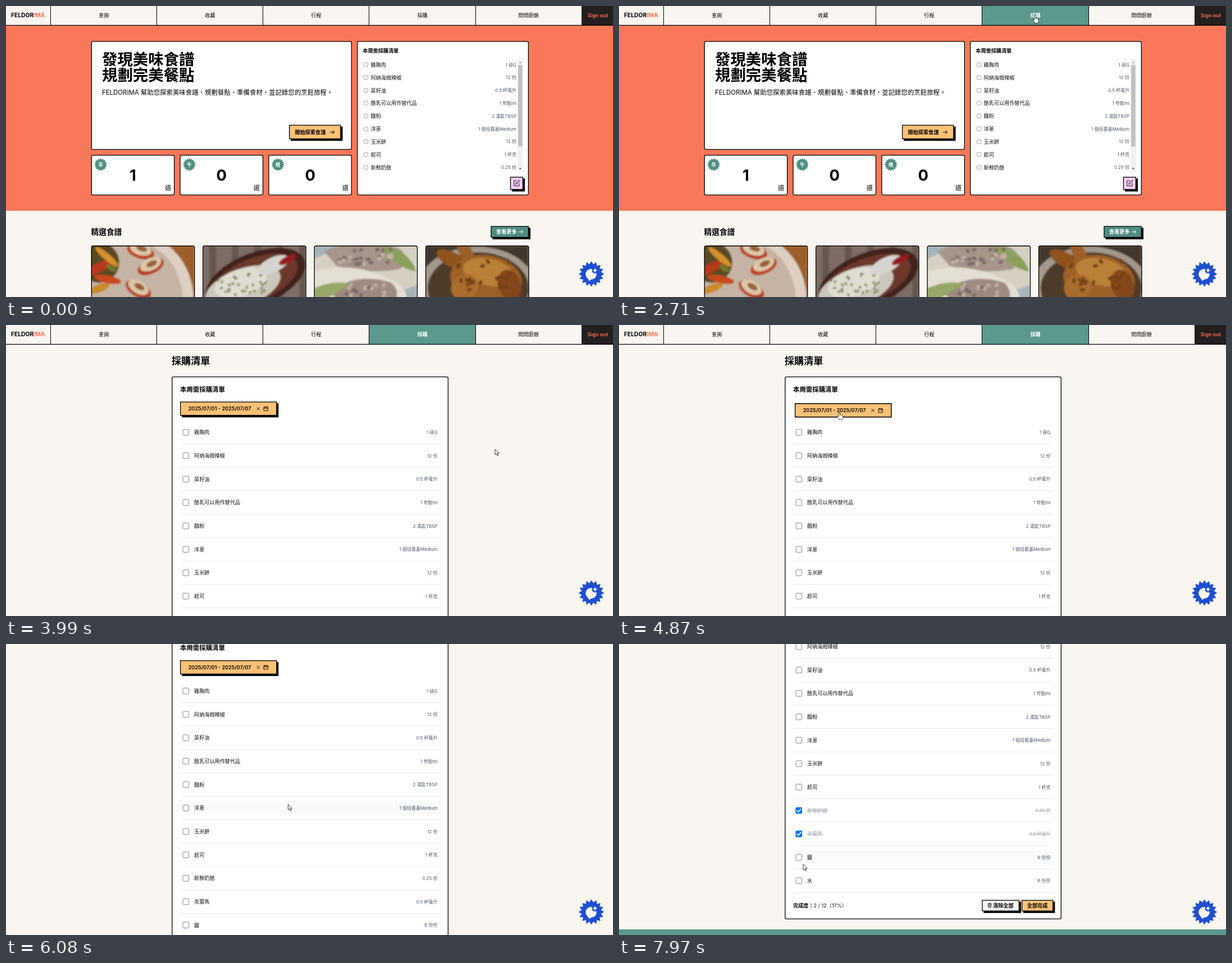
Recreate the animation shown at these times as an HTML page. Size 1081 by 518 pixels, loop 8 s.

```html
<!DOCTYPE html>
<html lang="zh-Hant">
<head>
<meta charset="utf-8">
<title>Recipe planner</title>
<style>
  html, body { margin: 0; width: 100%; height: 100%; overflow: hidden; background: #f9f5f0; }
  svg { display: block; width: 1081px; height: 518px; }
  text { font-family: Inter, "Noto Sans CJK TC", "Noto Sans TC", "Noto Sans CJK", sans-serif; white-space: pre; }
</style>
</head>
<body>
<svg id="stage" viewBox="0 0 1081 518" xmlns="http://www.w3.org/2000/svg"></svg>
<script>
const LOOP = 8000;
const INK = '#000', CREAM = '#f9f5f0', CORAL = '#fa785a', GREEN = '#5a998c', TEAL = '#4f8d80',
      AMBER = '#fec176', GREY = '#4b5563', MUTED = '#9ca3af', BLUE = '#1d4fd0';
const BASE = 9.14, ROW0 = 191, PITCH = 41.67, SCROLL = 228;

const items = [
  ['雞胸肉', '1 磅G'], ['阿納海姆辣椒', '12 份'], ['菜籽油', '0.5 杯毫升'],
  ['酪乳可以用作替代品', '1 夸脫ml'], ['麵粉', '2 湯匙TBSP'], ['洋蔥', '1 個培養基Medium'],
  ['玉米餅', '12 份'], ['起司', '1 杯克'], ['新鮮奶酪', '0.25 份'],
  ['克雷馬', '0.5 杯毫升'], ['鹽', '6 份份'], ['水', '6 份份']
];

// Shape helpers: text is placed by its vertical centre, boxes by their outer corners.
const text = (x, y, size, str, attrs = '') =>
  `<text x="${x}" y="${y + size * 0.376}" font-size="${size}" ${attrs}>${str}</text>`;
const bold = (x, y, size, str, attrs = '') => text(x, y, size, str, 'font-weight="700" ' + attrs);
const fillBox = (x, y, x2, y2, fill, attrs = '') =>
  `<rect x="${x}" y="${y}" width="${x2 - x}" height="${y2 - y}" fill="${fill}" ${attrs}/>`;
const box = (x, y, x2, y2, fill, r = 0, w = 1.3, stroke = INK) =>
  fillBox(x + w / 2, y + w / 2, x2 - w / 2, y2 - w / 2, fill, `rx="${r}" stroke="${stroke}" stroke-width="${w}"`);
const button = (x, y, x2, y2, fill, r = 0, d = 3) =>
  fillBox(x + d, y + d, x2 + d, y2 + d, INK, `rx="${r}"`) + box(x, y, x2, y2, fill, r);
const line = (d, stroke = INK, w = 1) =>
  `<path d="${d}" fill="none" stroke="${stroke}" stroke-width="${w}" stroke-linecap="round" stroke-linejoin="round"/>`;
const oval = (x, y, rx, ry, fill, rot = 0) =>
  `<ellipse rx="${rx}" ry="${ry}" fill="${fill}" transform="translate(${x} ${y}) rotate(${rot})"/>`;
const shape = (d, fill) => `<path d="${d}" fill="${fill}"/>`;
const arrow = (x, y, color) => line(`M${x} ${y}h7m-3 -3l3 3l-3 3`, color);
const burst = (cx, cy, outer, fill) => {
  const n = 16;
  const pts = Array.from({ length: n * 2 }, (_, i) => {
    const a = Math.PI * i / n - Math.PI / 2, r = i % 2 ? outer * .77 : outer;
    return (cx + r * Math.cos(a)).toFixed(2) + ',' + (cy + r * Math.sin(a)).toFixed(2);
  });
  return `<polygon points="${pts.join(' ')}" fill="${fill}"/>`;
};
const scatter = (n, seed, draw) => {
  const rnd = () => (seed = (seed * 16807) % 2147483647) / 2147483647;
  return Array.from({ length: n }, () => draw(rnd)).join('');
};
const END = 'text-anchor="end"', MID = 'text-anchor="middle"';

function header() {
  const names = ['查詢', '收藏', '行程', '採購', '問問廚娘'];
  let s = fillBox(0, 0, 1081, 34, CREAM);
  s += `<g id="tab" opacity="0">${fillBox(647, 0, 836, 34, GREEN)}</g>`;
  names.forEach((n, i) => {
    const left = Math.floor(79.2 + 189.2 * i);
    s += fillBox(left, 0, left + 1, 34, INK);
    s += text(174.2 + 189.1 * i, 16.5, BASE, n, MID + (i === 3 ? ' id="tabText"' : ''));
  });
  s += fillBox(1025, 0, 1081, 34, '#231f20') + fillBox(836, 0, 837, 34, INK);
  s += text(1054, 16.5, BASE, 'Sign out', `${MID} font-weight="600" fill="#fb7150"`);
  s += bold(9, 16.5, 10.3, `FELDOR<tspan fill="${CORAL}">IMA</tspan>`);
  return s + fillBox(0, 33.8, 1081, 35, INK);
}

// Soft stand-ins for the food pictures, each on a 184 x 95 field.
const dishes = [
  () => fillBox(0, 0, 184, 95, '#9d5f2c') + oval(72, 95, 110, 118, '#ddcfc2') + oval(64, 98, 99, 110, '#c5b3a4') +
    oval(14, 30, 36, 36, '#5a4a24') + oval(12, 40, 28, 8, '#b8371c', -28) + oval(28, 20, 26, 6, '#d6902a', 40) +
    oval(30, 60, 24, 7, '#c8481f', 12) + oval(14, 76, 20, 7, '#c98a2c', -20) + oval(36, 40, 10, 5, '#75752c', 30) +
    [[88, 6, 18], [106, 33, -24], [84, 74, 30]].map(([x, y, r]) =>
      oval(x, y + 4, 25, 13, '#b93f20', r) + oval(x, y, 20, 11, '#dcc7a8', r) + oval(x + 2, y - 1, 10, 5, '#966239', r)).join(''),
  () => fillBox(0, 0, 184, 95, '#7d6d65') +
    [12, 52, 92, 132, 172].map(x => fillBox(x, 0, x + 12, 95, '#66564f')).join('') +
    oval(94, 60, 94, 47, '#43201a', -22) + oval(92, 61, 82, 38, '#6c382c', -22) +
    oval(72, 74, 70, 33, '#cbc7bb', -20) + oval(68, 66, 48, 24, '#dfdcd2', -18) +
    oval(126, 34, 30, 13, '#d6d4d0', -25) + oval(151, 25, 17, 6, '#951f1c', -28) +
    scatter(28, 71, r => oval(28 + r() * 84, 48 + r() * 40, 3, 2, '#7b8654', r() * 180)),
  () => fillBox(0, 0, 184, 95, '#a5b5b9') + shape('M0 24Q45 2 90 -4H184V70L110 95H0Z', '#d6d0c3') +
    shape('M18 10Q78 -18 150 4Q176 22 152 42Q92 52 40 36Z', '#a5958a') +
    shape('M116 0Q168 4 182 46Q150 42 116 0Z', '#8ba05a') + shape('M0 46Q72 26 140 62Q168 78 164 95H0Z', '#e4dfd3') +
    shape('M28 82Q75 46 138 66Q152 80 146 95H40Z', '#9d8a80') + shape('M0 76Q36 60 66 68Q42 82 22 95H0Z', '#96a767') +
    scatter(30, 13, r => oval(46 + r() * 92, 4 + r() * 30, 4, 3, r() < .5 ? '#c5b4a6' : '#796a69', r() * 180)) +
    scatter(16, 29, r => oval(58 + r() * 74, 68 + r() * 22, 4, 3, r() < .5 ? '#c0afa2' : '#756565', r() * 180)),
  () => fillBox(0, 0, 184, 95, '#43372f') + oval(92, 72, 103, 70, '#a3988b') + oval(94, 76, 90, 64, '#4e3a2c') +
    oval(48, 25, 31, 13, '#8f531f', 28) + oval(72, 12, 22, 11, '#9c5f27', 55) +
    oval(108, 60, 64, 43, '#9d6127', 8) + oval(112, 47, 46, 24, '#bb8039', 12) + oval(70, 74, 25, 22, '#ab6d2d', -30) +
    oval(150, 70, 20, 28, '#84461a', -18) +
    scatter(20, 47, r => oval(58 + r() * 96, 26 + r() * 58, 5, 3, '#754019', r() * 180))
];

function home() {
  let s = fillBox(0, 35, 1081, 364.6, CORAL);
  s += box(151.6, 62.4, 616, 256, '#fff', 2.5);
  s += bold(171, 95, 27.43, '發現美味食譜') + bold(171, 122.4, 27.43, '規劃完美餐點');
  s += text(171, 153.3, 11.43, 'FELDORIMA');
  s += text(239.8, 153.3, 11.43, '幫助您探索美味食譜、規劃餐點、準備食材，並記錄您的烹飪旅程。');
  s += button(504, 211.6, 596.5, 237, AMBER) + bold(514.5, 224.5, BASE, '開始探索食譜') + arrow(577.5, 224.7, INK);
  ['早', '午', '晚'].forEach((meal, i) => {
    const x = 151.6 + 157.85 * i;
    s += box(x, 265, x + 148.7, 337, '#fff', 2.5) + burst(x + 17, 282.3, 11.7, TEAL);
    s += bold(x + 17, 282.3, 8.6, meal, MID + ' fill="#fff"');
    s += bold(x + 74.4, 301, 27.43, i ? 0 : 1, MID) + text(x + 131.4, 323.3, 11.43, '道');
  });

  s += box(625, 62.4, 931, 337, '#fff', 2.5) + bold(635.3, 79.3, BASE, '本周需採購清單');
  items.slice(0, 9).forEach(([name, amount], i) => {
    const y = 104.5 + 22.83 * i;
    s += box(637.2, y - 3.8, 644.8, y + 3.8, '#fff', 1.2, .7, '#767676');
    s += text(649.5, y, BASE, name, 'fill="#111"') + text(909, y, 8, amount, `${END} fill="${GREY}"`);
  });
  s += fillBox(911, 95, 920.7, 294.5, '#f1f1f1') + fillBox(912, 105, 919.7, 250, '#c1c1c1');
  s += shape('M913.5 101.5h4.6l-2.3 -2.6Z', '#999') + shape('M913.5 288.5h4.6l-2.3 2.6Z', '#444');
  s += button(897.8, 304, 921, 327.2, '#f4cef5');
  s += line('M909 311h-4.2v9.2h9.2v-4.2M908 317l.4 -2l5 -5l1.6 1.6l-5 5Z', INK, .9);

  s += bold(151.5, 402, 13.71, '精選食譜');
  s += button(863.3, 391.7, 931, 412.3, TEAL) + bold(873, 402, BASE, '查看更多', 'fill="#fff"') + arrow(913.5, 402, '#fff');
  s += '<clipPath id="photo"><rect width="184.6" height="110" rx="3"/></clipPath>' +
       '<filter id="soft"><feGaussianBlur stdDeviation="1.6"/></filter>';
  dishes.forEach((dish, i) => {
    s += `<g transform="translate(${151.7 + 198.4 * i} 426.6)"><g clip-path="url(#photo)"><g filter="url(#soft)">${dish()}</g></g>` +
         box(0, 0, 184.6, 110, 'none', 3) + '</g>';
  });
  return s;
}

const cart = line('M478.6 198h1.8l1.2 5.6h5l1.4 -4.4h-7M482 205.6h5M480.8 200.8h6.4M484 199.4v4', '#888', .9) +
  oval(482.6, 206.3, .9, .9, '#777') + oval(486.4, 206.3, .9, .9, '#777');

function shop() {
  let s = bold(295, 63.3, 17.14, '採購清單');
  s += `<g id="emptyCard">${box(295.2, 91.8, 788, 329, '#fff', 2.5)}</g>`;
  s += `<g id="listCard">${box(295.2, 91.8, 788, 718, '#fff', 2.5)}</g>`;
  s += bold(310, 114.5, 11.43, '本周需採購清單');
  s += fillBox(313, 139.4, 485.3, 164.4, INK);
  s += `<g id="dates">${box(310, 136.4, 482.5, 161.4, AMBER)}` +
    text(324.7, 149, BASE, '2025/07/01 - 2025/07/07', 'font-weight="600"') +
    line('M446.8 146.6l4.8 4.8m0 -4.8l-4.8 4.8', INK, .9) +
    line('M459.4 146h7v6.6h-7ZM459.4 148.2h7M461.2 144.8v2M464.6 144.8v2', INK, .9) + '</g>';

  s += '<g id="empty">' +
    fillBox(310.4, 180, 773, 281, 'none', 'rx="4" stroke="#b0b0b0" stroke-width=".7" stroke-dasharray="2 1.6"') + cart +
    text(493, 202, 10.29, '目前沒有需要採購的項目', 'fill="#222"') +
    text(541.5, 226, BASE, '你還沒有安排任何行程喔', `${MID} fill="#6b7280"`) +
    button(499.5, 241.8, 584, 267, AMBER, 3.5) + bold(541.8, 254.6, BASE, '去安排本週菜單', MID) + '</g>';

  s += '<g id="list">' + fillBox(310, 0, 773.5, 23.4, '#f8fafb', 'id="hover" rx="1"');
  items.forEach(([name, amount], i) => {
    const y = ROW0 + PITCH * i;
    s += `<g id="row${i}">` + box(314.6, y - 5.7, 326, y + 5.7, '#fff', 1.6, .9, '#767676') +
      `<g class="tick">${fillBox(314.6, y - 5.7, 326, y + 5.7, '#0075ff', 'rx="1.6"')}` +
      line(`M317 ${y + .2}l2.3 2.4l4.4 -5`, '#fff', 1.6) + '</g>' +
      text(335, y, BASE, name, 'class="name"') + text(768.5, y, 8, amount, `class="amount" ${END}`) + '</g>' +
      fillBox(310, y + 20.4, 773.5, y + 21.2, '#e3e5e9');
  });
  s += '</g><g id="summary">' + bold(310, 304.6, BASE, '完成度：') + text(346.5, 304.6, BASE, '', 'id="count" fill="#111"') +
    button(646.3, 294.6, 713, 314.8, '#f6f3f1') +
    line('M656.8 301.8h6.6M658.8 301.6v-1.2h2.6v1.2M657.5 302.2l.4 5.6h4.4l.4 -5.6M659.4 303.6v2.6M660.9 303.6v2.6', INK, .8) +
    bold(666, 304.6, BASE, '清除全部') +
    button(717, 294.6, 773.4, 314.8, AMBER) + bold(726.8, 304.6, BASE, '全部完成') + '</g>';
  return s + fillBox(0, 736, 1081, 760, GREEN, 'id="footer"');
}

const chat = burst(1042.5, 477, 22.8, BLUE) + oval(1042, 477.5, 9.8, 9.6, CREAM) +
  shape('M1036 485l2.5 4.5l5 -3.5Z', CREAM) + oval(1048.8, 470.6, 5.4, 5.4, BLUE) +
  shape('M1049 466.2l1.3 3.1l3.1 1.3l-3.1 1.3l-1.3 3.1l-1.3 -3.1l-3.1 -1.3l3.1 -1.3Z', CREAM);

const pointers = '<g id="cursor" fill="#fff" stroke="#111" stroke-width=".8" stroke-linejoin="round">' +
  '<path id="arrow" d="M0 0V10.2L2.4 8L4 11.8L5.6 11.1L4 7.4H7.2Z"/>' +
  '<path id="hand" d="M-1.2 8V1Q-1.2 0 0 0Q1.1 0 1.1 1V5Q2.2 4.6 2.9 5.4Q4 5 4.6 5.9Q6.2 5.6 6.2 7.3V9.5Q6.2 11 5.2 12.2V13.6H-.6V12.6Q-2 11 -3.6 8.4Q-4 7.2 -2.9 7Q-2 7 -1.2 8Z"/></g>';

document.getElementById('stage').innerHTML = fillBox(0, 0, 1081, 518, CREAM) +
  `<g id="page"><g id="home">${home()}</g><g id="shop">${shop()}</g>${header()}</g>${chat}${pointers}`;

const $ = id => document.getElementById(id);
const show = (el, on) => el.setAttribute('display', on ? 'inline' : 'none');
const move = (id, x, y) => $(id).setAttribute('transform', `translate(${x.toFixed(2)} ${y.toFixed(2)})`);

// time, x, y of the pointer tip
const path = [
  [440, 1050, 517], [1190, 742, 12], [1720, 742, 12], [2640, 741, 17], [3650, 741, 17],
  [3990, 871, 221], [4180, 871, 221], [4300, 866, 230], [4870, 392.5, 155], [5600, 392.5, 155],
  [5870, 511, 265.5], [6350, 490, 314], [6410, 490, 314], [6750, 322.5, 291], [7200, 322.5, 291],
  [7630, 322.5, 333], [7760, 322.5, 333], [7970, 328, 392]
];
const ramp = (t, a, b) => {
  const u = Math.min(1, Math.max(0, (t - a) / (b - a)));
  return u * u * (3 - 2 * u);
};
function pointerAt(t) {
  const i = path.findIndex(k => k[0] > t);
  if (i < 1) return (i ? path[path.length - 1] : path[0]).slice(1);
  const [a, ax, ay] = path[i - 1], [b, bx, by] = path[i];
  const u = ramp(t, a, b);
  return [ax + (bx - ax) * u, ay + (by - ay) * u];
}

function draw(t) {
  const [x, y] = pointerAt(t);
  const onShop = t >= 3060, loaded = t >= 3190;
  const scroll = SCROLL * ramp(t, 5832, 6350), py = y + scroll;
  const lit = ramp(t, 1080, 1190);

  show($('home'), !onShop);
  show($('shop'), onShop);
  ['empty', 'emptyCard'].forEach(id => show($(id), !loaded));
  ['list', 'listCard', 'footer'].forEach(id => show($(id), loaded));
  move('page', 0, -scroll);
  move('summary', 0, loaded ? 389 : 0);

  $('tab').setAttribute('opacity', lit);
  $('tabText').setAttribute('fill', lit > .5 ? '#fff' : INK);
  $('tabText').setAttribute('font-weight', lit > .5 ? 700 : 400);

  const onDates = loaded && x > 310 && x < 485 && py > 137 && py < 164;
  move('dates', onDates ? 3 : 0, onDates ? 3 : 0);

  const row = Math.round((py - ROW0) / PITCH), rowY = ROW0 + PITCH * row;
  const onRow = loaded && row >= 0 && row < items.length && Math.abs(py - rowY) < 12.6 && x > 310 && x < 773;
  show($('hover'), onRow);
  $('hover').setAttribute('y', rowY - 11.7);

  const done = { 8: t >= 6950, 9: t >= 7760 };
  items.forEach((_, i) => {
    const g = $('row' + i);
    show(g.querySelector('.tick'), done[i]);
    [['.name', '#111'], ['.amount', GREY]].forEach(([sel, color]) => {
      const el = g.querySelector(sel);
      el.setAttribute('fill', done[i] ? MUTED : color);
      el.setAttribute('text-decoration', done[i] ? 'line-through' : 'none');
    });
  });
  const n = done[8] + done[9], total = loaded ? items.length : 0;
  $('count').textContent = `${n} / ${total}（${total ? Math.round(100 * n / total) : 0}%）`;

  const hand = py < 34 || onDates || (onRow && x > 313 && x < 328 && Math.abs(py - rowY) < 8);
  show($('cursor'), t >= 440 && (t < 1720 || t >= 2640));
  show($('hand'), hand);
  show($('arrow'), !hand);
  move('cursor', x, y);
}

const start = performance.now();
function tick() {
  draw((performance.now() - start) % LOOP);
  requestAnimationFrame(tick);
}
tick();
</script>
</body>
</html>
```
